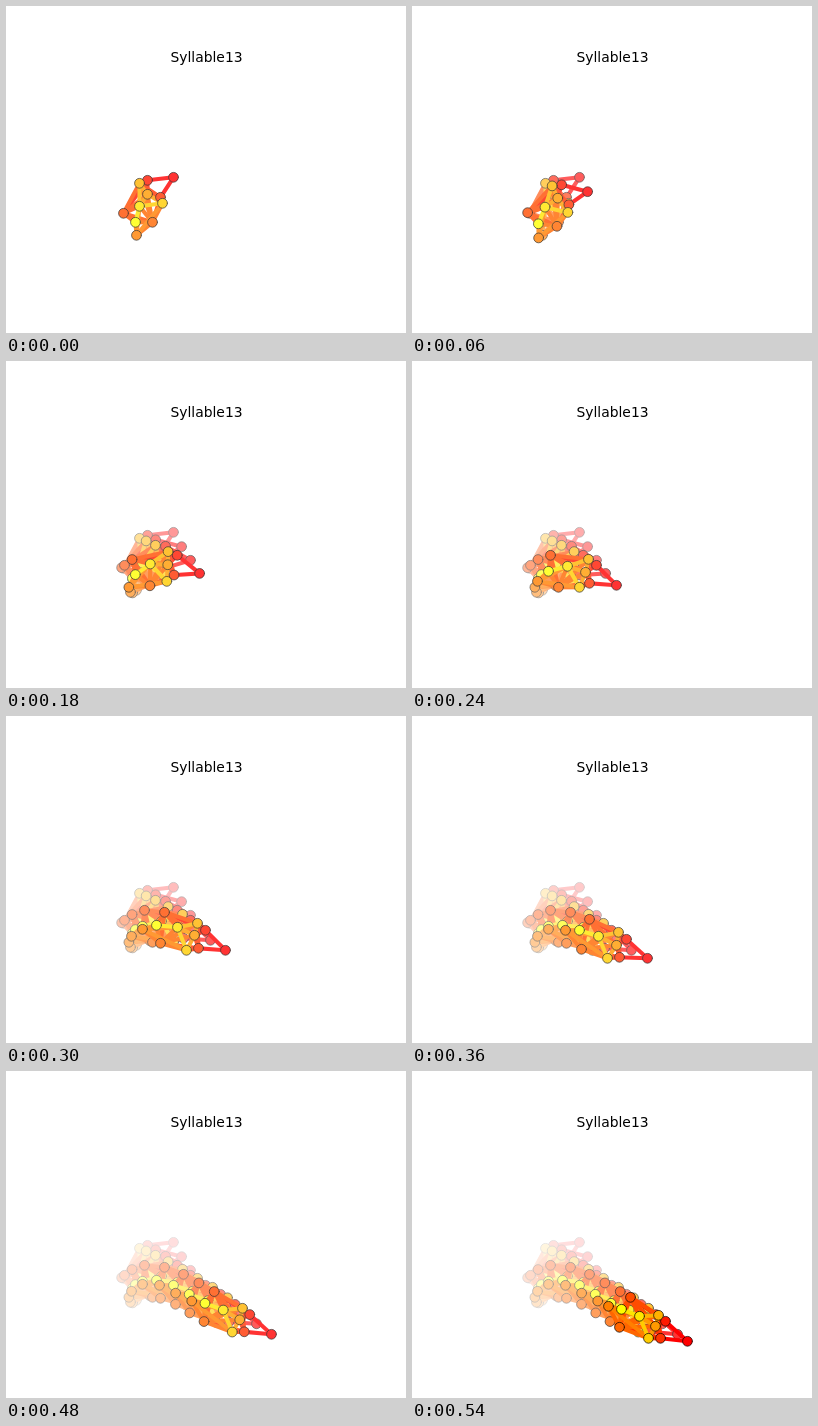
Animation of 400x327 px, one loop 600 ms. Source, as an HTML page with a canvas:

```html
<!DOCTYPE html>
<html lang="en">
<head>
<meta charset="utf-8">
<title>Syllable13</title>
<style>
  html, body { margin: 0; width: 100%; height: 100%; overflow: hidden; background: #fff; }
  svg, canvas { position: absolute; left: 0; top: 0; display: block; }
  text { font: 13.89px "DejaVu Sans", sans-serif; text-anchor: middle; }
</style>
</head>
<body>
<canvas id="stage" width="400" height="327"></canvas>
<svg width="400" height="327"><text x="200.5" y="56">Syllable13</text></svg>
<script>
const ctx = document.getElementById('stage').getContext('2d');
const STEP = 60, COUNT = 10, FADE = 0.2;

// Key poses by step: x, y of nose, ears, hips, tail base, neck, shoulders, spine
const keys = {
  0: [167,171, 141,174, 154,191, 117,207, 146,216, 130,229, 141,188, 133,177, 156,197, 133,200, 129,216],
  2: [184,199, 159,185, 161,206, 118,204, 144,223, 124,231, 152,197, 149,184, 157,214, 136,202, 126,217],
  4: [204,224, 184,204, 177,222, 138,194, 146,226, 125,220, 173,211, 176,198, 167,226, 155,205, 136,210],
  5: [219,234, 199,214, 192,232, 158,196, 154,227, 136,213, 188,219, 191,207, 180,234, 171,211, 150,209],
  6: [235,242, 214,223, 207,241, 177,203, 169,233, 153,214, 204,229, 206,216, 195,242, 186,220, 167,214],
  9: [275,270, 253,250, 248,267, 218,226, 207,256, 196,235, 243,255, 246,244, 236,267, 227,245, 209,238]
};

// Steps between the keys as weighted sums of neighbouring keys
const blends = {
  1: { 0: 0.375, 2: 0.75, 4: -0.125 },
  3: { 0: -0.0625, 2: 0.5625, 4: 0.5625, 6: -0.0625 },
  7: { 6: 0.625, 9: 0.375 },
  8: { 6: 0.25, 9: 0.75 }
};

// Neighbours of each joint with a higher index
const links = [[1, 2], [3, 6, 7], [4, 6, 7, 8], [4, 6, 7, 9, 10], [5, 6, 7, 8, 9, 10],
               [8, 9, 10], [7, 8, 9], [9], [9], [10]];

function pose(step) {
  if (keys[step]) return keys[step];
  const parts = Object.entries(blends[step]);
  return keys[0].map((_, i) => parts.reduce((sum, [k, w]) => sum + w * keys[k][i], 0));
}

const poses = Array.from({ length: COUNT }, (_, i) => {
  const p = pose(i);
  return Array.from({ length: 11 }, (_, j) => [p[2 * j] + 0.5, p[2 * j + 1] + 0.3]);
});

const autumn = j => `rgb(255,${Math.floor(25.5 * j)},0)`;

function drawPose(joints) {
  ctx.lineWidth = 4.1;
  ctx.lineCap = 'square';
  links.forEach((ends, a) => {
    ctx.strokeStyle = autumn(a);
    for (const b of ends) {
      ctx.beginPath();
      ctx.moveTo(...joints[a]);
      ctx.lineTo(...joints[b]);
      ctx.stroke();
    }
  });
  ctx.lineWidth = 0.7;
  ctx.strokeStyle = '#000';
  joints.forEach(([x, y], j) => {
    ctx.fillStyle = autumn(j);
    ctx.beginPath();
    ctx.arc(x, y, 4.9, 0, 2 * Math.PI);
    ctx.fill();
    ctx.stroke();
  });
}

function draw(step) {
  ctx.fillStyle = '#fff';
  ctx.fillRect(0, 0, 400, 327);
  for (let i = 0; i <= step; i++) {
    drawPose(poses[i]);
    if (i < COUNT - 1) {
      ctx.fillStyle = `rgba(255,255,255,${FADE})`;
      ctx.fillRect(0, 0, 400, 327);
    }
  }
}

const start = performance.now();
let shown = -1;
function tick() {
  const step = Math.floor((performance.now() - start) / STEP) % COUNT;
  if (step !== shown) draw(shown = step);
  requestAnimationFrame(tick);
}
tick();
</script>
</body>
</html>
```
